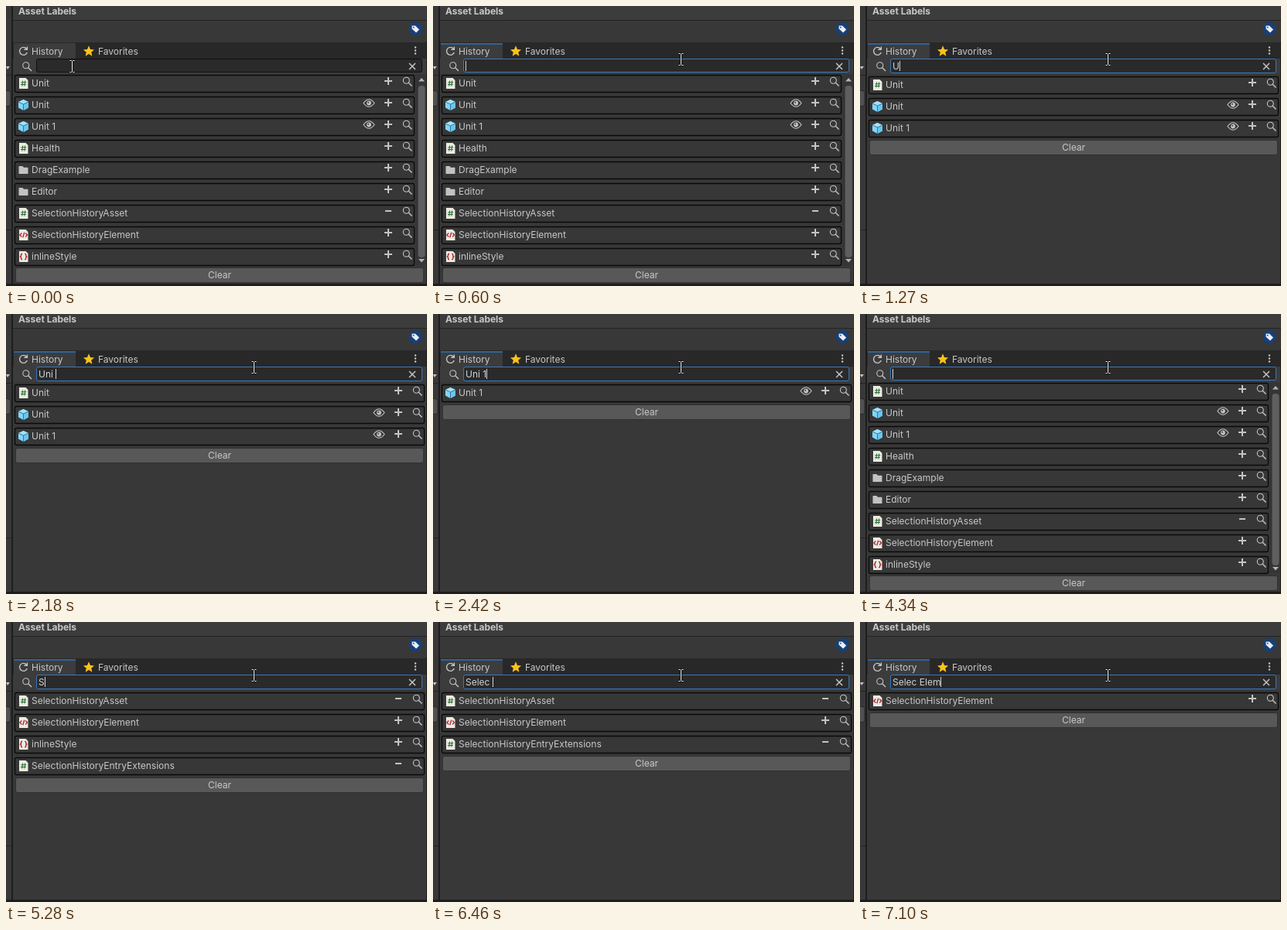
An HTML page that plays this animation: 544 px wide and 362 px high, repeating every 8000 ms.

```html
<!DOCTYPE html>
<html lang="en">
<head>
<meta charset="utf-8">
<title>Selection history search</title>
<style>
html, body { margin: 0; width: 100%; height: 100%; overflow: hidden; background: #383838; }
svg { display: block; width: 544px; height: 362px; }
text { font: 12px Inter, sans-serif; fill: #c8c8c8; white-space: pre; }
.line { fill: none; stroke: #c4c4c4; }
</style>
</head>
<body>
<svg id="stage" viewBox="0 0 544 362">
  <defs>
    <g id="lens" class="line" stroke-width="1.1"><circle r="4" cx="-1.2" cy="-1.2"/><path d="M1.8 1.8L6 6" stroke-width="1.4"/></g>
    <path id="plus" class="line" stroke-width="2" d="M-5 0H5M0-5V5"/>
    <path id="minus" class="line" stroke-width="2" d="M-4 0H4"/>
    <g id="eye"><path class="line" stroke-width="1.2" d="M-7 0Q0-9.5 7 0Q0 9.5-7 0Z"/><circle r="2.9" fill="#c4c4c4"/><circle cx="-.8" cy="-.8" r="1" fill="#444"/></g>
    <path id="page" d="M-5.5-7H3L6-4V7H-5.5Z" fill="#ecece2"/>
    <g id="script"><use href="#page"/><path fill="none" stroke="#2c6e35" stroke-width="1.1" d="M-.8-3.5L-1.7 3.5M2.2-3.5L1.3 3.5M-3.2-1.2H3.8M-3.6 1.5H3.4"/></g>
    <g id="markup"><use href="#page"/><path fill="none" stroke="#b3202c" stroke-width="1.3" d="M-2.2-2.5L-4.6 0L-2.2 2.5M2.7-2.5L5 0L2.7 2.5M1.2-3.3L-.7 3.3"/></g>
    <g id="style"><use href="#page"/><path fill="none" stroke="#b3202c" stroke-width="1.4" d="M-1.4-3.8Q-3-3.8-3-2V-1L-4 0L-3 1V2Q-3 3.8-1.4 3.8M1.7-3.8Q3.3-3.8 3.3-2V-1L4.3 0L3.3 1V2Q3.3 3.8 1.7 3.8"/></g>
    <g id="cube"><path d="M0-7L6.5-4V3.6L0 7L-6.5 3.6V-4Z" fill="#7fd6fc"/><path d="M0-7L6.5-4L0-1L-6.5-4Z" fill="#a2e2fd"/><path d="M0-1L6.5-4V3.6L0 7Z" fill="#67c6f3"/><path d="M-6.5-4L0-1L6.5-4M0-1V7" fill="none" stroke="#2f5a70" stroke-width=".8"/></g>
    <path id="folder" d="M-6-4.5Q-6-5-5.5-5H-1L.5-3.2H5.5Q6-3.2 6-2.7V4.5Q6 5 5.5 5H-5.5Q-6 5-6 4.5Z" fill="#c2c2c2"/>
  </defs>

  <rect width="544" height="362" fill="#383838"/>
  <rect x="9" width="535" height="18" fill="#3c3c3c"/>
  <path d="M9 18.5H544" stroke="#242424"/>
  <text x="16" y="11" style="font-weight:700">Asset Labels</text>
  <circle cx="529" cy="29.5" r="8.5" fill="#16407a"/>
  <path d="M524.5 25.5H529L534 30.5L530 34.5L524.5 29.5Z" fill="#eee"/>
  <circle cx="526.7" cy="27.7" r=".9" fill="#16407a"/>

  <rect x="9" y="47" width="535" height="21" fill="#282828"/>
  <path d="M10 68V50Q10 48 12 48H88Q90 48 90 50V68Z" fill="#3c3c3c"/>
  <path id="tabline" d="M10 49H90" stroke="#2f6499" stroke-width="2"/>
  <path class="line" stroke-width="1.4" d="M26.5 55.3A5 5 0 1 0 27.3 60M27.4 52.5V56.3H23.4"/>
  <text x="33" y="63">History</text>
  <path id="star" fill="#fcc21b"/>
  <text x="119" y="63">Favorites</text>
  <g fill="#c4c4c4"><circle cx="529" cy="53.5" r="1.2"/><circle cx="529" cy="57.5" r="1.2"/><circle cx="529" cy="61.5" r="1.2"/></g>

  <rect x="9" y="68" width="535" height="20" fill="#3c3c3c"/>
  <use href="#lens" x="27" y="78"/>
  <rect id="field" x="39.5" y="68.5" width="498" rx="2.5" fill="#2a2a2a"/>
  <path class="line" stroke-width="1.5" d="M521 74L529 82M529 74L521 82"/>
  <text id="query" x="42" y="82" style="fill:#d2d2d2"></text>
  <path id="caret" d="M0 71V84" stroke="#d2d2d2"/>

  <g id="rows"></g>
  <g id="bar">
    <rect x="529" y="88" width="15" height="247" fill="#353535"/>
    <path d="M533 97.5L537 93L541 97.5ZM533 327L537 331.5L541 327Z" fill="#b4b4b4"/>
    <rect x="532.5" y="103" width="9" height="222" rx="4" fill="#5f5f5f"/>
  </g>
  <g id="clear">
    <rect x="12.5" y=".5" width="527" height="19" rx="2.5" fill="#585858" stroke="#303030"/>
    <text x="276" y="14" text-anchor="middle">Clear</text>
  </g>

  <rect y="0" width="8" height="362" fill="#383838"/>
  <path d="M0 78H5L2 82Z" fill="#c4c4c4"/>
  <path d="M0 89.5H7M0 289.5H7" stroke="#242424"/>
  <rect x="-4" y="109.5" width="10" height="20" rx="3" fill="#515151" stroke="#282828"/>
  <path d="M8 0V362" stroke="#1d1d1d" stroke-width="2"/>
  <path d="M543.5 46V362" stroke="#242424"/>
  <rect y="359" width="544" height="3" fill="#1d1d1d"/>

  <g id="beam" fill="none">
    <path d="M-3-7.5H-1L0-6.5L1-7.5H3M0-6.5V6.5M-3 7.5H-1L0 6.5L1 7.5H3" stroke="#151515" stroke-width="2.4"/>
    <path d="M-3-7.5H-1L0-6.5L1-7.5H3M0-6.5V6.5M-3 7.5H-1L0 6.5L1 7.5H3" stroke="#f2f2f2"/>
  </g>
  <path id="arrow" d="M0 0V16L3.7 12.6L6.2 18.2L8.6 17.1L6.2 11.7H11.3Z" fill="#fff" stroke="#111" stroke-width=".9"/>
</svg>
<script>
const LOOP = 8000;
const $ = id => document.getElementById(id);
const set = (el, attrs) => { for (const k in attrs) el.setAttribute(k, attrs[k]); };
const show = (el, on) => set(el, { visibility: on ? 'visible' : 'hidden' });
const move = (el, x, y) => set(el, { transform: `translate(${x} ${y})` });

// name, icon, tools on the right
const items = [
  ['Unit', 'script', 'plus'],
  ['Unit', 'cube', 'plus', 'eye'],
  ['Unit 1', 'cube', 'plus', 'eye'],
  ['Health', 'script', 'plus'],
  ['DragExample', 'folder', 'plus'],
  ['Editor', 'folder', 'plus'],
  ['SelectionHistoryAsset', 'script', 'minus'],
  ['SelectionHistoryElement', 'markup', 'plus'],
  ['inlineStyle', 'style', 'plus'],
  ['SelectionHistoryEntryExtensions', 'script', 'minus']
];
const VISIBLE = 9;

const typed = [
  [0, ''], [1270, 'U'], [1440, 'Un'], [1510, 'Uni'], [2180, 'Uni '], [2420, 'Uni 1'],
  [3760, 'Uni '], [3900, 'Uni'], [4030, 'Un'], [4200, 'U'], [4340, ''],
  [5280, 'S'], [5450, 'Se'], [5540, 'Sel'], [5620, 'Sele'], [5890, 'Selec'], [6460, 'Selec '],
  [6730, 'Selec E'], [6830, 'Selec El'], [6930, 'Selec Ele'], [7100, 'Selec Elem']
];

const rows = items.map(([name, icon, tool, eye]) => {
  const g = document.createElementNS('http://www.w3.org/2000/svg', 'g');
  g.innerHTML = `<rect x="11.5" y=".5" height="22" rx="2" fill="#373737" stroke="#0a0a0a" stroke-width="1.3"/>
    <use href="#${icon}" x="22.5" y="11"/><text x="33" y="15">${name}</text>
    <g>${eye ? '<use href="#eye" x="469" y="8.5"/>' : ''}<use href="#${tool}" x="494" y="8"/><use href="#lens" x="518.5" y="8.5"/></g>`;
  $('rows').append(g);
  return { g, box: g.firstElementChild, tools: g.lastElementChild, name: name.toLowerCase() };
});

const starPoints = [...Array(10).keys()].map(i => {
  const a = i * Math.PI / 5, r = i % 2 ? 3.4 : 7.4;
  return `${107 + r * Math.sin(a)} ${58.7 - r * Math.cos(a)}`;
});
set($('star'), { d: `M${starPoints.join('L')}Z` });

function layout(query) {
  const full = !query;
  const words = query.toLowerCase().split(' ');
  const shift = full ? 0 : 13;
  let n = 0;
  for (const { g, box, tools, name } of rows) {
    const on = full ? n < VISIBLE : words.every(w => name.includes(w));
    show(g, on);
    if (!on) continue;
    move(g, 0, (full ? 89 : 91) + 28 * n++);
    set(box, { width: 516 + shift });
    move(tools, shift, 0);
  }
  show($('bar'), full);
  move($('clear'), 0, full ? 338 : 89 + 28 * n);
  set($('field'), { height: full ? 17 : 18 });
}

function pointer(t) {
  if (t < 30) return [85, 78];
  if (t < 230) return [85, 77];
  const p = Math.min(1, (Math.floor((t - 230) / 41) + 1) / 10);
  const u = p * p * (3 - 2 * p), v = 1 - u;
  return [85 * v + 320 * u, 77 * v * v + 2 * 110 * u * v + 69 * u * u].map(Math.round);
}

function draw(t) {
  const query = typed.findLast(([at]) => t >= at)[1];
  const focus = t >= 230;
  layout(query);
  $('query').textContent = query;
  const width = query ? $('query').getComputedTextLength() : 0;
  move($('caret'), Math.round(42 + width) + .5, 0);
  show($('caret'), focus);
  show($('tabline'), focus);
  set($('field'), { stroke: focus ? '#3a79bb' : '#101010' });
  const [x, y] = pointer(t);
  const inField = y < 88;
  show($('beam'), inField);
  show($('arrow'), !inField);
  move($('beam'), x + .5, y);
  move($('arrow'), x, y);
}

const start = performance.now();
function tick(now) {
  draw(Math.max(0, now - start) % LOOP);
  requestAnimationFrame(tick);
}
draw(0);
requestAnimationFrame(tick);
</script>
</body>
</html>
```
